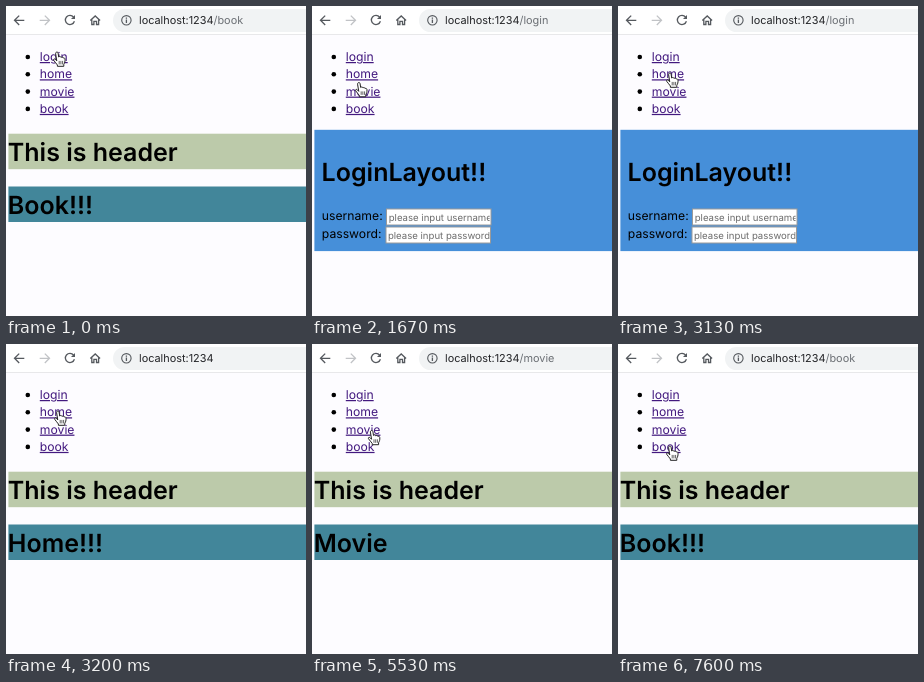
Animation, 300 px wide and 310 px high, one loop 7740 ms. Source, as an HTML page:

```html
<!DOCTYPE html>
<html lang="en">
<head>
<meta charset="utf-8">
<title>Router demo</title>
<style>
  html, body { margin: 0; width: 100%; height: 100%; overflow: hidden; background: #fdfcff; }
  svg { display: block; font: 12.2px Inter, "Liberation Sans", sans-serif; text-rendering: geometricPrecision; }
  .icon { fill: none; stroke: #55595e; stroke-width: 1.3; }
  .url { font-size: 10.9px; fill: #222326; }
  .title { font-size: 25px; font-weight: 600; }
  .link { fill: #43197f; }
  .hint { font-size: 9.6px; fill: #6c6c6c; }
  .field { fill: #fff; stroke: #9a9a9a; }
</style>
</head>
<body>
<svg width="300" height="310" viewBox="0 0 300 310">
  <defs>
    <clipPath id="inside"><rect x="75" y="202" width="102.7" height="36"/></clipPath>
  </defs>

  <rect width="300" height="28" fill="#fff"/>
  <rect y="28" width="300" height="1" fill="#e8e8ea"/>
  <rect x="107" y="3" width="220" height="23" rx="11.5" fill="#f1f3f4"/>
  <g class="icon">
    <path d="M18.3 14.3H8.7M13.2 9.6L8.5 14.3L13.2 19"/>
    <path d="M33.7 14.3H43.3M38.8 9.6L43.5 14.3L38.8 19" stroke="#c1c3c6"/>
    <path d="M67.6 11.1A4.6 4.6 0 1 0 68.4 15.3"/>
    <path d="M69 9V13H65Z" fill="#55595e" stroke="none"/>
    <path d="M84.3 14.5L89.2 10L94.1 14.5M85.8 13.5V18.5H87.9V15.3H90.5V18.5H92.6V13.5"/>
    <circle cx="120.4" cy="14.3" r="4.7" stroke-width="1.1"/>
    <path d="M120.4 13.6V17M120.4 11.5V12.7"/>
  </g>
  <text class="url" x="133" y="18.2">localhost:1234<tspan id="path" fill="#6b6f74"></tspan></text>

  <g id="menu"></g>

  <g id="main">
    <rect x="2.4" y="127.7" width="298" height="35.5" fill="#bccaaa"/>
    <text class="title" x="1.8" y="154.7">This is header</text>
    <rect x="2.4" y="180.5" width="298" height="35.5" fill="#42869a"/>
    <text class="title" id="heading" x="1.8" y="207.6"></text>
  </g>

  <g id="login">
    <rect x="2.4" y="123.8" width="298" height="121.3" fill="#468fd9"/>
    <text class="title" x="9.6" y="174.9">LoginLayout!!</text>
    <text x="9.8" y="214.2">username:</text>
    <text x="9.8" y="232.2">password:</text>
    <rect class="field" x="74.5" y="203" width="104.5" height="16"/>
    <rect class="field" x="74" y="221" width="104.5" height="16"/>
    <g class="hint" clip-path="url(#inside)">
      <text x="76.7" y="214.5">please input username</text>
      <text x="75.9" y="232.6">please input password</text>
    </g>
  </g>

  <g id="hand" stroke="#222" stroke-linejoin="round" stroke-linecap="round">
    <path fill="#fff" stroke-width="1" d="M-1.4 1.3C-1.4-.4.9-.4 1.1 1.1L1.7 5C2.4 4.2 3.7 4.4 4 5.4C4.7 4.8 5.9 5.1 6.1 6C7 5.6 8 6.1 8 7.2C8.2 9.5 7.6 11 6.8 12.3V14.3H.4V13C-.8 11.5-2 10-3.3 8.3C-3.9 7.2-2.6 6.4-1.7 7.3L-.5 8.6Z"/>
    <path stroke-width=".7" d="M2.2 9.3V12M3.9 9.3V12M5.6 9.3V12"/>
  </g>
</svg>
<script>
const LOOP = 7740, FPS = 15;
const $ = id => document.getElementById(id);

$('menu').innerHTML = ['login', 'home', 'movie', 'book'].map((name, i) => {
  const y = 55 + i * 17.3;
  return `<circle cx="21.8" cy="${y - 4}" r="2.3"/>
    <text class="link" x="33.8" y="${y}" text-decoration="underline">${name}</text>`;
}).join('');

// [start, path, heading]
const pages = [
  [0, '/book', 'Book!!!'],
  [730, '/login', ''],
  [3195, '', 'Home!!!'],
  [5000, '/movie', 'Movie'],
  [6730, '/book', 'Book!!!']
];

// [start, end, x, y]: the pointer glides to x, y
const START = [51, 46];
const moves = [
  [1330, 2000, 43, 106.5],
  [2130, 2870, 52, 67],
  [3800, 4530, 60, 86],
  [5470, 6130, 52, 102]
];

function pointerAt(t) {
  let [x, y] = START;
  for (const [from, to, tx, ty] of moves) {
    const p = Math.min(1, Math.max(0, (t - from) / (to - from)));
    const e = p * p * (3 - 2 * p);
    x += (tx - x) * e;
    y += (ty - y) * e;
  }
  return [x, y];
}

function draw(now) {
  const t = now % LOOP;
  const [, path, heading] = pages.findLast(page => t >= page[0]);
  const onLogin = path === '/login';
  $('path').textContent = path;
  $('heading').textContent = heading;
  $('login').style.display = onLogin ? '' : 'none';
  $('main').style.display = onLogin ? 'none' : '';

  const stepped = Math.floor((t + 5) * FPS / 1000) * 1000 / FPS;
  $('hand').setAttribute('transform', `translate(${pointerAt(stepped)})`);
}

const begin = performance.now();
function tick() {
  draw(performance.now() - begin);
  requestAnimationFrame(tick);
}
tick();
</script>
</body>
</html>
```
